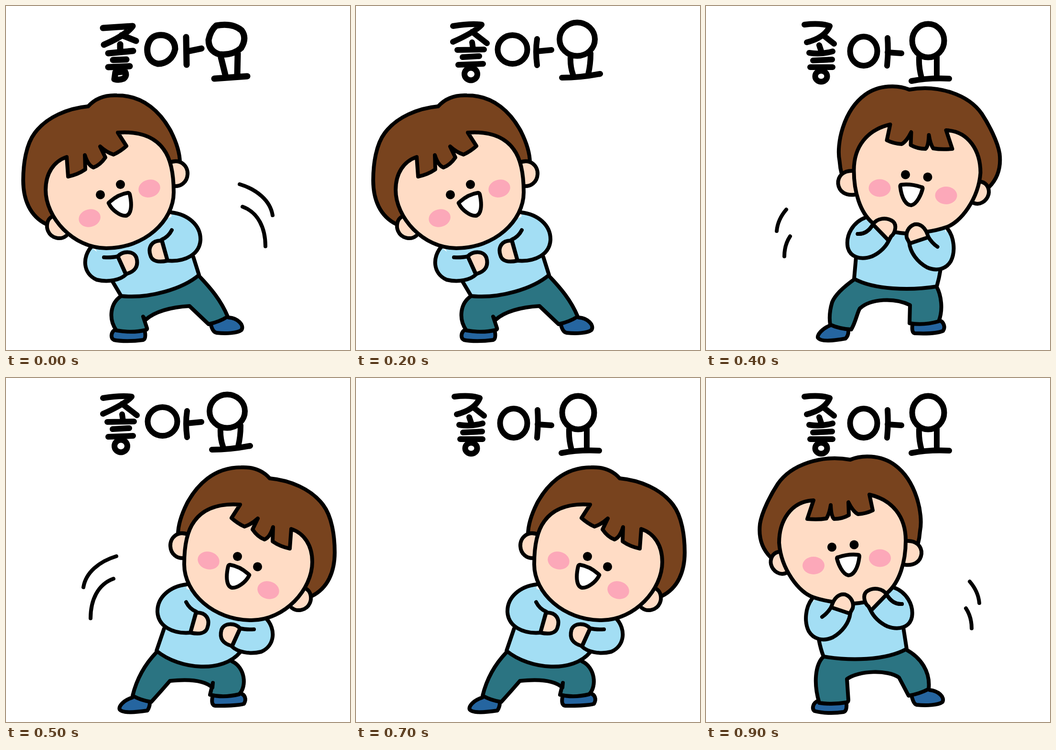
Animation, 720 px wide and 720 px high, one loop 1 s. Source, as an HTML page:

```html
<!DOCTYPE html>
<html lang="ko">
<head>
<meta charset="utf-8">
<title>좋아요</title>
<style>
html, body { margin: 0; width: 100%; height: 100%; overflow: hidden; background: #fff; }
svg { display: block; width: 100%; height: 100%; }
</style>
</head>
<body>
<svg id="stage" viewBox="0 0 720 720" role="img" aria-label="좋아요" fill="none" stroke="#000" stroke-width="8" stroke-linecap="round" stroke-linejoin="round"></svg>
<script>
const HAIR = '#78431e', SKIN = '#ffdcc5', SHIRT = '#a3def4', PANTS = '#2b7482', SHOE = '#2565a0', CHEEK = '#fca8b9';

const path = (d, fill = 'none', extra = '') => `<path d="${d}" fill="${fill}" ${extra}/>`;
const oval = (x, y, rx, ry, fill = 'none', extra = '') =>
  `<ellipse cx="${x}" cy="${y}" rx="${rx}" ry="${ry}" fill="${fill}" ${extra}/>`;
const group = (inner, attr) => `<g ${attr}>${inner}</g>`;
const mirror = (inner, sum, dy = 0) => group(inner, `transform="matrix(-1 0 0 1 ${sum} ${dy})"`);
const eye = (x, y) => oval(x, y, 9.5, 9.5, '#000', 'stroke="none"');
const cheek = (x, y, tilt) => oval(x, y, 23, 18.5, CHEEK, `stroke="none" transform="rotate(${tilt} ${x} ${y})"`);

// Head and arms, both facing left; the right side mirrors them.
const leanTop =
  path('M178,505C160,525 160,560 190,573C215,579 240,573 251,562L234,524Q222,527 205,526', SHIRT) +
  path('M346,432C380,436 408,458 407,490C405,520 375,536 338,533L326,489Q340,483 347,469', SHIRT) +
  path('M234,524C245,512 268,512 273,527C278,545 270,556 251,561Z', SKIN) +
  path('M326,491C305,490 297,505 302,521C305,535 320,537 338,533Z', SKIN) +
  path('M85,457C50,440 36,405 36,365C36,330 42,290 60,266C85,232 130,214 172,210C188,192 210,186 232,187C290,187 325,225 345,262C358,288 364,310 364,328', HAIR) +
  path('M342,328C365,318 381,335 380,352C379,370 365,378 352,377', SKIN) +
  path('M96,441C85,447 84,462 88,471C95,487 115,490 126,481', SKIN) +
  path('M127,316C100,325 83,350 83,385C83,442 140,507 210,507C290,507 351,450 351,390C351,350 345,320 330,300C310,272 275,262 234,265L252,293Q240,304 225,311Q210,306 197,294L208,317Q197,333 183,338Q172,334 165,312L166,342Q150,353 130,357Z', SKIN) +
  cheek(300, 382, -15) + cheek(175, 444, -15) + eye(197.5, 395) + eye(239.5, 373.5) +
  path('M217,410Q235,394 255,391Q258,391 259,394C265,420 261,437 251,439C240,440 222,428 215,413Q214,412 217,410Z', '#fff');

const midTop =
  path('M222,462C208,480 205,510 215,530C225,547 245,552 265,543C285,532 300,512 302,492L263,478Q255,492 243,500', SHIRT) +
  path('M392,438C420,448 435,475 431,500C427,521 405,529 380,520C362,512 350,498 345,487L378,453Q390,474 410,473', SHIRT) +
  path('M135,375C115,355 110,330 113,305C117,280 135,245 150,222C178,181 242,160 302,171C325,161 365,160 395,182C440,215 455,285 448,320Q447,335 443,350', HAIR) +
  path('M420,341C440,340 452,352 451,368C449,385 435,393 417,391', SKIN) +
  path('M151,364C138,367 134,380 136,390C140,405 155,414 168,408', SKIN) +
  path('M225,256C177,258 153,300 153,345C157,400 195,450 225,459C250,468 285,472 310,472C338,470 362,463 379,450C405,428 418,385 418,340C418,290 390,255 342,244L349,277Q335,284 318,285Q308,280 298,260L299,287Q285,295 268,295Q262,290 261,266Q258,285 252,294Q235,297 212,295Z', SKIN) +
  cheek(225, 392.5, 0) + cheek(364, 377, 0) + eye(263.5, 354) + eye(310, 349) +
  path('M277,375Q297,368 318,370Q321,370 321,374C318,400 308,413 298,413C286,411 277,390 274,378Q274,375 277,375Z', '#fff') +
  path('M262,480C268,458 280,451 291,453C305,458 310,472 307,482L301,493Z', SKIN) +
  path('M345,487L378,453C370,440 350,437 336,447C327,455 332,472 340,478Z', SKIN) +
  path('M378,453Q390,474 410,473');

const lower = (shoeL, shoeR, pants, edge, top) =>
  path(shoeL, SHOE) + path(shoeR, SHOE) + path(pants, PANTS) +
  path(edge + top, SHIRT, 'stroke="none"') + path(edge);

const poses = {
  leanL: lower(
    'M228,678C220,682 218,695 226,699C240,702 265,702 287,699Q293,697 291,683',
    'M429,668Q433,683 441,684C460,686 485,685 493,678C499,668 485,653 466,652',
    'M241,607C218,622 214,655 231,679Q265,685 293,678Q296,677 295,674L287,650L292,657C310,640 345,630 384,628L424,666Q447,661 464,650C450,616 428,590 404,565',
    'M222,575L241,607C300,613 370,592 404,563L392,525', 'L350,440L180,495') + leanTop,
  midL: lower(
    'M234,676C224,680 221,692 227,697C245,702 270,702 288,699Q295,697 294,682',
    'M431,668Q435,683 441,684C460,686 487,685 495,678C500,668 487,655 468,653',
    'M246,583C228,600 225,640 237,680Q265,684 294,679Q298,678 298,674L295,630C320,612 380,610 404,627L424,665Q447,661 466,651C470,615 450,585 418,568',
    'M236,547Q240,568 246,583C300,592 375,592 420,567L413,522', 'L418,480L394,438L225,459') + midTop,
  midR: lower(
    'M259,669C243,675 233,688 234,694C240,704 270,700 292,696Q298,690 298,681',
    'M432,667Q430,684 437,685C460,686 485,685 496,680C502,672 497,660 488,658',
    'M312,571C285,590 270,605 264,620C258,640 258,655 260,667Q280,676 304,677C313,663 317,640 322,633C345,612 395,610 427,626L426,664Q455,669 487,660C497,635 492,605 483,588',
    'M491,551Q488,570 483,587C427,596 352,594 310,571L314,526', 'L309,484L333,442L502,463') + mirror(midTop, 727.5, 4),
  leanR: lower(
    'M264,669C245,675 235,688 238,694C245,703 275,699 296,696Q301,688 301,680',
    'M432,668Q429,685 438,686C460,686 485,686 498,682C504,672 500,662 490,660',
    'M315,574C290,600 273,632 265,665Q283,675 304,678Q325,655 343,634C380,630 415,632 432,648L433,638L427,663Q455,670 488,662C505,645 500,605 473,593',
    'M331,524L315,571C365,612 455,617 490,574', 'L545,505L375,440') + mirror(leanTop, 724)
};

// Lean a little further with the feet planted.
const push = (inner, k) => group(inner, `transform="matrix(1 0 ${k} 1 ${-k * 690} 0)"`);
poses.farL = push(poses.leanL, .0185);
poses.farR = push(poses.leanR, -.0185);

const lettering = (d, ovals, width = 12) =>
  group(path(d) + ovals.map(o => oval(...o)).join(''), `stroke-width="${width}"`);

const words = {
  a: lettering('M203,46L265,42Q250,62 205,81M242,61L272,73M239,80V96M214,99L266,94M224,113L252,112M214,128L259,126M229,139L249,137Q254,146 246,152Q236,156 227,153ZM320,61C340,59 354,72 354,90C350,110 335,121 318,121C302,118 294,104 296,86C299,70 308,62 320,61ZM377,65L378,123M380,95L409,89M440,41Q474,35 493,51Q505,67 492,88Q474,104 446,101Q424,94 424,71Q428,51 440,41ZM450,108L459,144M485,100L484,144M436,152L505,147', [], 13),
  b: lettering('M203,42Q240,36 263,39Q250,54 203,75M243,54L274,78M243,76L245,90M212,92L268,91M223,107L258,105M214,123L266,121M379,69Q375,95 379,124M378,95L409,92M449,106Q448,126 454,143M491,99Q491,122 486,143M431,150Q470,150 511,142', [[240.5, 142.5, 13.5, 13], [327.5, 91, 31, 30], [463, 69.5, 37, 35]]),
  c: lettering('M206,39Q240,35 259,42Q249,66 211,76M245,61L268,79M237,82L242,97M216,98Q240,102 265,95M224,114L264,112M218,128L265,128M380,67Q382,96 379,125M380,97L409,99M446,107Q445,128 451,150M483,106V150M430,157Q465,150 509,152', [[241, 147, 12.5, 11.5], [330, 94.5, 28.5, 30.5], [465, 72.5, 33.5, 35]])
};

const bigSwish = path('M489,373C525,384 553,407 558,438M495,420C528,432 543,465 543,503');
const smallSwish = path('M552,426Q570,447 572,471M544,482Q556,500 556,524');

const steps = [
  ['leanL', 'a', bigSwish],
  ['farL', 'c', bigSwish],
  ['leanL', 'b', ''],
  ['midL', 'a', ''],
  ['midR', 'c', mirror(smallSwish, 720)],
  ['leanR', 'b', mirror(bigSwish, 720)],
  ['farR', 'a', mirror(bigSwish, 720)],
  ['leanR', 'c', ''],
  ['midR', 'b', ''],
  ['midL', 'c', smallSwish]
];

const stage = document.getElementById('stage');
const start = performance.now();
let shown = -1;

function draw() {
  const i = Math.floor((performance.now() - start) / 100) % steps.length;
  if (i !== shown) {
    const [pose, word, swish] = steps[i];
    stage.innerHTML = words[word] + poses[pose] + swish;
    shown = i;
  }
  requestAnimationFrame(draw);
}
draw();
</script>
</body>
</html>
```
